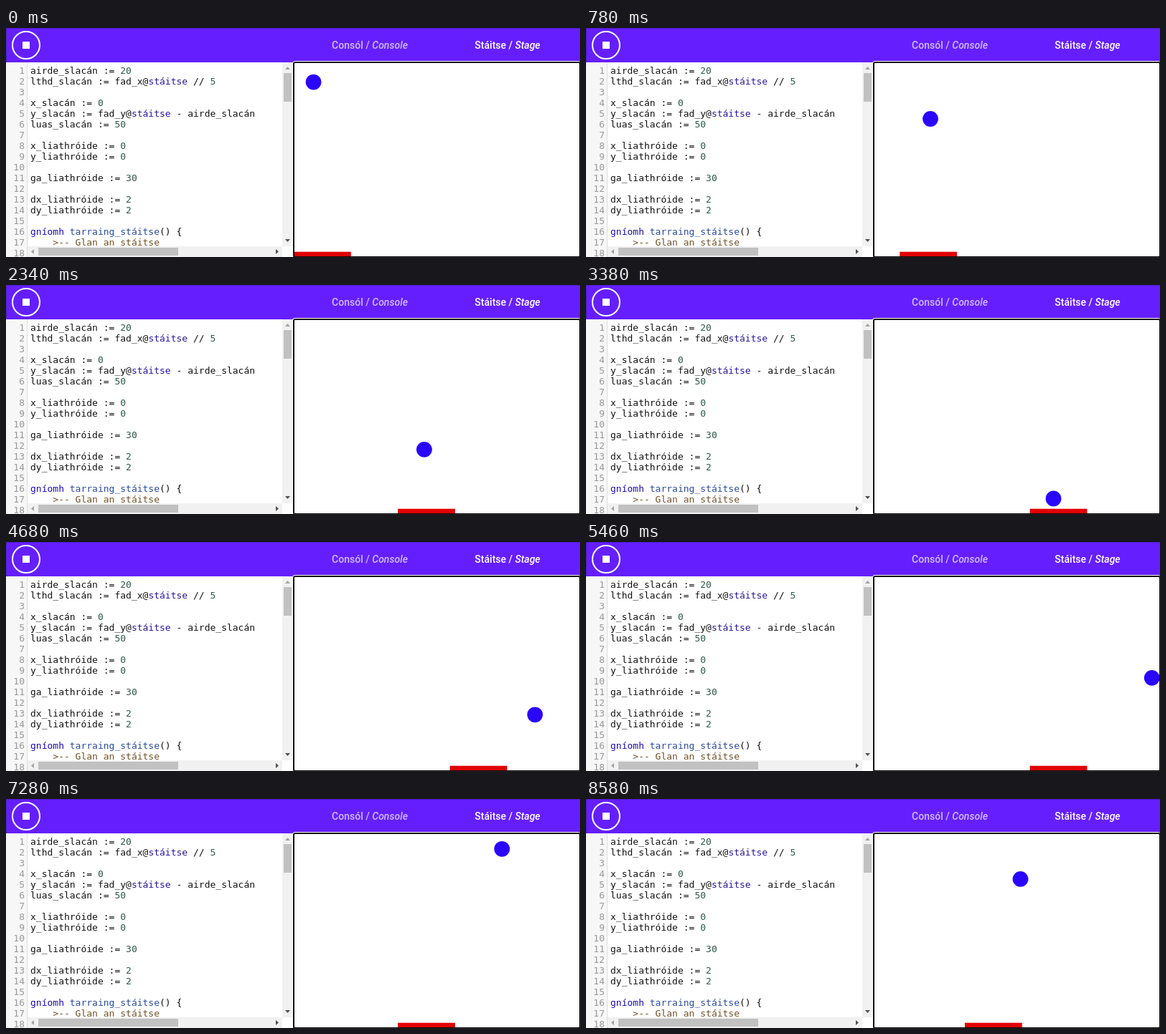
An HTML page for the animation above (8710 ms loop, 800 px wide and 320 px high).

```html
<!DOCTYPE html>
<html lang="ga">
<head>
<meta charset="utf-8">
<style>
  html, body { margin: 0; width: 100%; height: 100%; overflow: hidden; background: #fff; }
  #app { position: absolute; left: 0; top: 0; width: 800px; height: 320px; overflow: hidden; }
  #app > * { position: absolute; margin: 0; }
  svg { left: 0; top: 0; }
  pre { top: 52px; font: 13px/15px "DejaVu Sans Mono", monospace; color: #111; }
  #gutter { left: 0; width: 26px; text-align: right; color: #999; }
  #code { left: 34px; height: 253px; overflow: hidden; }
  .number { color: #2f5a4d; }
  .atom { color: #2a1596; }
  .keyword { color: #1c0ca8; }
  .def { color: #274a95; }
  .comment { color: #6f5128; }
  .tab { top: 0; width: 192px; text-align: center; white-space: nowrap;
         font: 500 14px/48px Roboto, sans-serif; color: #fff; }
  .idle { color: rgba(255, 255, 255, .7); }
</style>
</head>
<body>
<div id="app">
  <svg width="800" height="320">
    <rect width="800" height="48" fill="#651fff"/>
    <path d="M0 .5H800M.5 0V48" stroke="#4f1cc4"/>
    <circle cx="28" cy="24" r="19" fill="none" stroke="#fff" stroke-width="2"/>
    <rect x="23" y="19" width="10" height="10" fill="#fff"/>

    <rect y="48" width="29" height="272" fill="#f7f7f7"/>
    <rect x="29" y="48" width="1" height="272" fill="#ddd"/>

    <path d="M385 48h15v257h-15zM30 305h355v15H30z" fill="#f1f1f1"/>
    <path d="M387 63h11v40h-11zM45 307h195v11H45z" fill="#c1c1c1"/>
    <path d="M389 58l3.5-4 3.5 4zM39 309l-4 3.5 4 3.5z" fill="#a3a3a3"/>
    <path d="M389 295l3.5 4 3.5-4zM376 309l4 3.5-4 3.5z" fill="#505050"/>

    <rect x="399.5" y="46.5" width="401" height="274" rx="3" fill="#fff" stroke="#fff"/>
    <!-- The game runs on a 1100 by 750 board -->
    <svg x="401" y="48" width="399" height="272" viewBox="0 0 1100 750" preserveAspectRatio="none">
      <rect id="bat" y="730" width="220" height="20" fill="#e20000"/>
      <circle id="ball" r="30" fill="#2a06fb"/>
    </svg>
    <rect x="401" y="48" width="399" height="272" rx="2" fill="none" stroke="#101010" stroke-width="2"/>
  </svg>
  <div class="tab idle" style="left:411px">Consól / <i>Console</i></div>
  <div class="tab" style="left:603px">Stáitse / <i>Stage</i></div>
  <pre id="gutter"></pre>
  <pre id="code">airde_slacán := 20
lthd_slacán := fad_x@stáitse // 5

x_slacán := 0
y_slacán := fad_y@stáitse - airde_slacán
luas_slacán := 50

x_liathróide := 0
y_liathróide := 0

ga_liathróide := 30

dx_liathróide := 2
dy_liathróide := 2

gníomh tarraing_stáitse() {
    >-- Glan an stáitse</pre>
</div>
<script>
const $ = id => document.getElementById(id);

const tokens = /(?<comment>>--.*)|(?<keyword>gníomh)|(?<def>tarraing_stáitse)|(?<atom>(?<=@)stáitse)|(?<number>\b\d+)/g;
$('code').innerHTML = $('code').textContent.replace(tokens, (text, ...rest) => {
  const groups = rest.at(-1);
  const kind = Object.keys(groups).find(name => groups[name]);
  return `<span class="${kind}">${text}</span>`;
});
$('gutter').textContent = Array.from({ length: 18 }, (_, i) => i + 1).join('\n');

const STEP = 130, STEPS = 67;
const WIDTH = 1100, BAT_TOP = 730, BAT_STEP = 50;
const START = 76, SPEED = 23.64;
const leftPresses = [46, 50, 52.5, 55, 61];

// Reflects a steadily growing distance between 0 and the limit
const bounce = (distance, limit) => limit - Math.abs(limit - distance % (2 * limit));

function draw(now) {
  const step = Math.floor(now / STEP) % STEPS;
  const travelled = START + SPEED * step;
  $('ball').setAttribute('cx', bounce(travelled, WIDTH));
  $('ball').setAttribute('cy', bounce(travelled, BAT_TOP));

  const right = Math.min(12, Math.floor(step * 0.48));
  const left = leftPresses.filter(press => press <= step).length;
  $('bat').setAttribute('x', (right - left) * BAT_STEP);
}

let start;
function tick(now) {
  start ??= now;
  draw(now - start);
  requestAnimationFrame(tick);
}
draw(0);
requestAnimationFrame(tick);
</script>
</body>
</html>
```
